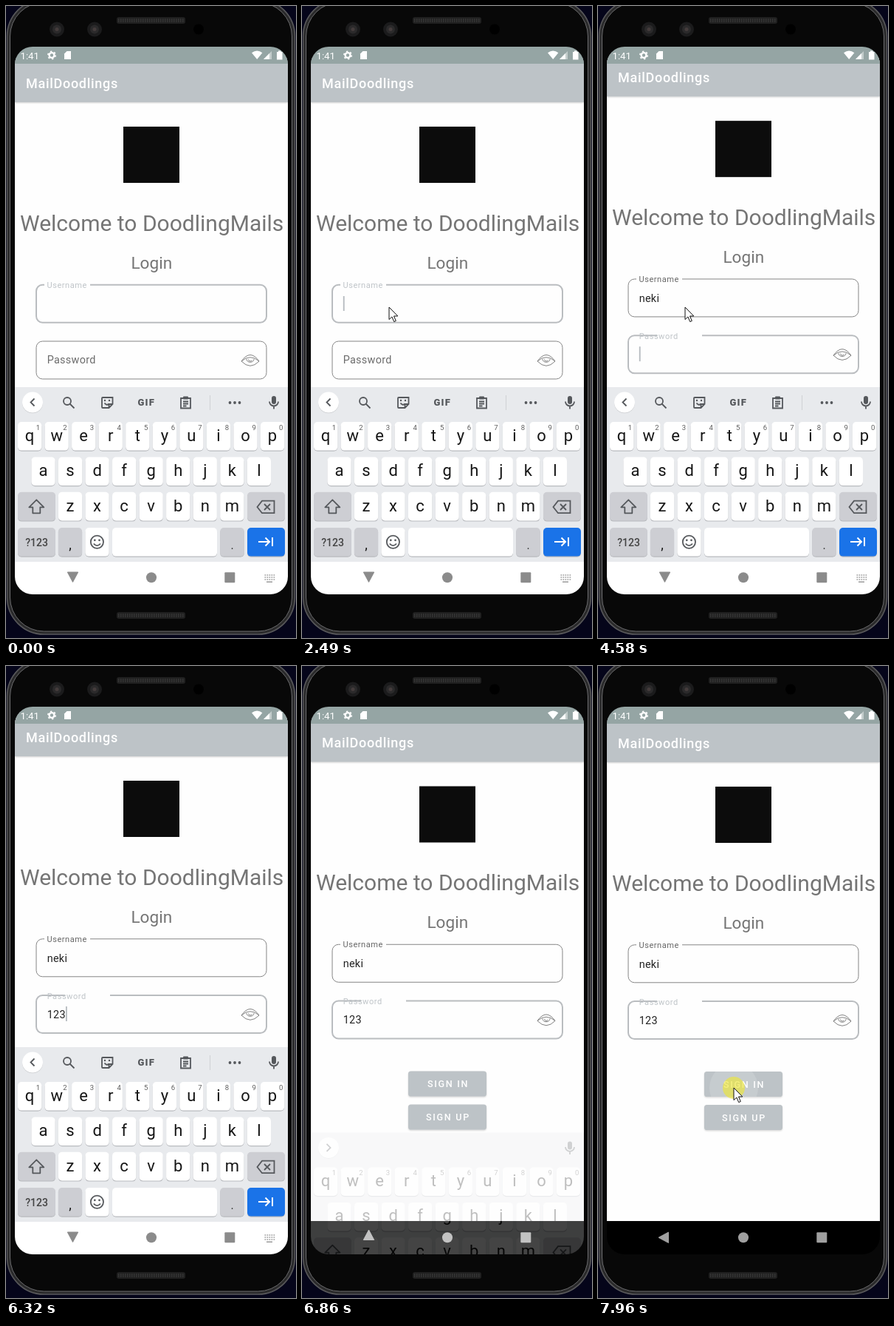
Recreate the animation shown at these times as an HTML page. Size 393 by 854 pixels, loop 8 s.

```html
<!DOCTYPE html>
<html lang="en">
<head>
<meta charset="utf-8">
<title>Login screen</title>
<style>
html, body { margin: 0; width: 100%; height: 100%; overflow: hidden; background: #05051a; }
svg { display: block; width: 100vw; height: 100vh; font-family: Roboto, "Noto Sans", sans-serif; }
text { white-space: pre; }
.mid { text-anchor: middle; }
.line { fill: none; stroke: #55585c; stroke-width: 1.8; }
</style>
</head>
<body>
<svg id="stage" viewBox="0 0 393 854"></svg>
<script>
const LOOP = 8000, USER = 'neki', PASS = '123';

const rect = (x, y, w, h, fill, r = 0, more = '') =>
  `<rect x="${x}" y="${y}" width="${w}" height="${h}" rx="${r}" fill="${fill}" ${more}/>`;
const circle = (x, y, r, fill, more = '') => `<circle cx="${x}" cy="${y}" r="${r}" fill="${fill}" ${more}/>`;
const path = (d, more = '') => `<path d="${d}" ${more}/>`;
const label = (s, x, y, size, fill, more = '') =>
  `<text x="${x}" y="${y}" font-size="${size}" fill="${fill}" ${more}>${s}</text>`;
const mid = (s, x, y, size, fill, more = '') => label(s, x, y, size, fill, 'class="mid" ' + more);

// Outlined text box whose top edge is open between a and b
const boxPath = (y, a, b) =>
  `M${b} ${y}H344.5a8.5 8.5 0 0 1 8.5 8.5v34a8.5 8.5 0 0 1-8.5 8.5H49.5a8.5 8.5 0 0 1-8.5-8.5v-34a8.5 8.5 0 0 1 8.5-8.5H${a}`;

function phone() {
  const speaker = y => rect(150, y, 93, 9, '#202020', 3) +
    path(`M152 ${y + 4.5}h89`, 'stroke="#343434" stroke-width="5" stroke-dasharray="1.5 1.5"');
  const lens = (x, r) => circle(x, 31.5, r, '#1b1b1c') + circle(x, 31.5, r * .6, '#2b2a2b') + circle(x, 31.5, 2.5, '#443c3c');
  return rect(1.5, -9, 390, 858, '#2a2a2b', 50, 'stroke="#5a5a5c" stroke-width="1.5"') +
    rect(5.5, -5, 382, 850, '#080808', 46, 'stroke="#6c6c6e" stroke-width="1"') +
    speaker(15) + speaker(819) + lens(69, 10) + lens(120, 10) + circle(261, 31.5, 7, '#000');
}

function statusBar() {
  return rect(12, 55, 370, 23, '#95a5a4') +
    label('1:41', 19.5, 71.5, 13.2, '#fff') +
    circle(62, 66.5, 3.4, 'none', 'stroke="#fff" stroke-width="2.4"') +
    circle(62, 66.5, 5.2, 'none', 'stroke="#fff" stroke-width="1.6" stroke-dasharray="2.4 3.04"') +
    path('M79 64.5l3.5-3.5h5.5v11h-9z', 'fill="#fff"') +
    path('M333 63.2q7.2-5.4 14.4 0L340.2 72z', 'fill="#fff"') +
    path('M360 61v11h-11z', 'fill="#fff" fill-opacity=".45"') + path('M357 64v8h-8z', 'fill="#fff"') +
    path('M367 62h2v-1.5h3.5V62h2v10.5H367z', 'fill="#fff"');
}

function button(s, y) {
  return rect(144, y + 1.2, 106, 34, '#000', 3.6, 'opacity=".16" filter="url(#soft)"') +
    rect(144, y, 106, 34, '#bdc3c7', 3.6) +
    mid(s, 198, y + 21.8, 12.6, '#fff', 'font-weight="500" letter-spacing="1.7"');
}

function page() {
  return rect(12, 78, 370, 680, '#fefefe') +
    rect(12, 80, 370, 51, '#000', 0, 'opacity=".18" filter="url(#soft)"') +
    rect(12, 70, 370, 60, '#bdc3c7') +
    label('MailDoodlings', 27, 111, 18, '#fff', 'font-weight="500" letter-spacing=".7"') +
    rect(159, 163, 76, 76, '#0c0c0c') +
    label('Welcome to DoodlingMails', 19, 304, 30, '#757575') +
    mid('Login', 197.3, 355, 22.6, '#757575') +
    '<path id="userBox" fill="none"/>' + label('Username', 55.5, 381, 11, '', 'id="userLabel" letter-spacing=".55"') +
    label('', 55.7, 408, 14.4, '#222', 'id="user" letter-spacing=".3"') +
    '<rect id="under" x="56" y="409.6" height="1" fill="#333"/>' +
    '<path id="passBox" fill="none"/>' + label('Password', 55.7, 483, 14.4, '', 'id="passLabel"') +
    label('', 55.7, 484, 14.4, '#222', 'id="pass" letter-spacing=".3"') +
    '<rect id="caret" width="1.8" height="20" fill="#b4babe"/>' +
    `<g fill="none" stroke="#757575" stroke-width=".9">
      <path d="M319 480q12-17 24 0q-12 12.5-24 0q12-10.5 24 0"/>
      <path d="M325.8 477a5.3 5.3 0 0 0 10.4 0M328.6 477.5a2.5 2.5 0 0 0 4.8 1"/></g>` +
    button('SIGN IN', 548) + button('SIGN UP', 593) +
    '<g clip-path="url(#signIn)"><circle id="ripple" cx="184" cy="570" r="33" fill="#fff" opacity=".14"/></g>';
}

function key(x, y, w, s = '', fill = '#fff') {
  return rect(x, y + 1.2, w, 38.6, '#b9bbbf', 5) + rect(x, y, w, 38.6, fill, 5) +
    (s && mid(s, x + w / 2, Math.round(y + 25.7), 22, '#161616'));
}

function keys() {
  const row = (s, x, y) => [...s].map((c, i) => key(x + i * 36.55, y, 32.2, c)).join('');
  const grey = '#cdced3';
  return row('qwertyuiop', 16, 562) +
    [...'1234567890'].map((c, i) => mid(c, 43.3 + i * 36.6, 573, 9.5, '#5c5c5c')).join('') +
    row('asdfghjkl', 34.4, 609.5) + row('zxcvbnm', 70.9, 656.8) +
    key(16, 656.8, 51, '', grey) + key(327, 656.8, 51, '', grey) +
    path('M41.3 667.3l10 10h-5v8h-10v-8h-5z', 'class="line" stroke-linejoin="round"') +
    path('M347 668.7h16.5v16.5H347l-6.5-8.2zM350 673l8 8m0-8l-8 8', 'class="line"') +
    key(16, 705, 51, '', grey) + mid('?123', 41.5, 730, 14, '#444', 'font-weight="500"') +
    key(70.9, 705, 32.2, '', grey) + mid(',', 87, 734, 18, '#161616') + key(107.4, 705, 32.2) +
    circle(123.4, 724.3, 8.6, 'none', 'class="line"') +
    circle(120.3, 721.8, 1.4, '#55585c') + circle(126.5, 721.8, 1.4, '#55585c') +
    path('M118.8 726.5q4.6 5.4 9.2 0', 'class="line"') +
    key(144, 705, 142) + key(290.2, 705, 32.6, '', grey) + mid('.', 306.5, 734, 16, '#333') +
    key(327, 705, 51, '', '#1a73e8') +
    path('M342 724h15m-5.5-5.5l5.5 5.5l-5.5 5.5M361 718v12', 'fill="none" stroke="#fff" stroke-width="2"');
}

function tools() {
  return circle(83, 534, 5, 'none', 'class="line"') + path('M86.5 537.5l6 6', 'class="line" stroke-width="2.4"') +
    path('M131 529h13.5v9l-5 5H131q-1 0-1-1v-12q0-1 1-1zM144.5 538h-5v5M133.5 536.5q3 4 6 1', 'class="line"') +
    circle(134, 533, 1.2, '#55585c') + circle(140, 533, 1.2, '#55585c') +
    mid('GIF', 190.3, 540.3, 13, '#55585c', 'font-weight="900" letter-spacing="1.2"') +
    path('M237 530h13v13.5h-13zM240 534.5h7m-7 3h7m-7 3h4.5', 'class="line" stroke-width="1.6"') +
    rect(240, 527.5, 7, 4, '#55585c', 1) + rect(276, 526, 1, 20, '#cfd1d5') +
    [303.5, 310, 316.5].map(x => circle(x, 536, 1.9, '#55585c')).join('');
}

function words() {
  return mid('', 95, 542, 16.7, '#4a4d50', 'id="guess"') +
    mid('Never', 196, 542, 16.7, '#4a4d50') + mid('Needs', 297.5, 542, 16.7, '#4a4d50') +
    rect(142, 524, 1, 24, '#cfd1d5') + rect(249, 524, 1, 24, '#cfd1d5');
}

function keyboard() {
  return rect(12, 515, 370, 237, '#e8eaed') + rect(12, 751, 370, 60, '#fff') +
    circle(36, 536.3, 14, '#c8cacd') + circle(36, 535.6, 14, '#fff') +
    '<path id="chevron" class="line"/>' +
    `<g id="tools">${tools()}</g><g id="words">${words()}</g>` +
    rect(360, 527, 6, 11, '#55585c', 3) + path('M357 534.5a6 6 0 0 0 12 0M363 540.5v4', 'class="line"') + keys() +
    path('M350.5 769h14m-14 3h14m-14 3h14', 'stroke="#9a9a9a" stroke-width="1.6" stroke-dasharray="1.7 1.3"') +
    path('M353 778.3h8', 'stroke="#9a9a9a" stroke-width="1.6"');
}

document.getElementById('stage').innerHTML =
  `<defs><filter id="soft" x="-10%" y="-30%" width="120%" height="160%"><feGaussianBlur stdDeviation="1.3"/></filter>
    <clipPath id="screen">${rect(12, 55, 370, 740, '#000', 24)}</clipPath>
    <clipPath id="signIn">${rect(144, 548, 106, 34, '#000', 3.6)}</clipPath></defs>` +
  phone() + `<g clip-path="url(#screen)"><g id="page">${page()}</g>${rect(12, 750, 370, 45, '#000')}
    <g id="keyboard">${keyboard()}</g>${statusBar()}
    <g id="nav"><path id="back" d="M-7.5 0L6-7.2V7.2z" stroke-width="1" stroke-linejoin="round"/>
      ${circle(197, 772.3, 7, '')}${rect(296.3, 765.3, 14, 14, '', 1)}</g></g>` +
  '<circle id="click" r="15" fill="#efe62e" opacity=".62"/>' +
  path('M0 0V16.6L3.9 13L6.7 19.6L9.3 18.5L6.5 12H11.8z', 'id="mouse" fill="#fff" stroke="#111" stroke-width="1"');

const el = {};
document.querySelectorAll('[id]').forEach(e => el[e.id] = e);
const set = (name, attrs) => { for (const k in attrs) el[name].setAttribute(k, attrs[k]); };
const show = (name, on) => el[name].setAttribute('visibility', on ? 'inherit' : 'hidden');
const ramp = (t, a, b) => Math.min(1, Math.max(0, (t - a) / (b - a)));
const mix = (a, b, u) => a + (b - a) * u;
const count = (times, t) => times.filter(x => t >= x).length;

const SPANS = [[530, 660, 3], [920, 1690, 12], [4370, 4650, 5], [5770, 6320, 8], [6790, 7550, 12], [7620, 7960, 6]];
function snap(t) {
  const span = SPANS.find(([a, b]) => t >= a && t < b);
  if (!span) return t;
  const [a, b, n] = span, step = (b - a) / (n - 1);
  return a + Math.floor((t - a) / step + .01) * step;
}

const MOUSE = [[530, 222, 562], [660, 166, 430], [870, 166, 430], [1270, 125, 337], [1690, 118, 407],
  [5770, 118, 407], [6241, 360, 381], [7180, 360, 450], [7550, 186, 607], [7620, 186, 607], [7890, 184, 570]];
const BLINKS = [390, 920, 1410, 1960, 2490, 2950, 3490, 5770, 6320, 6790, 7270, 7820];

function mouseAt(t) {
  const i = MOUSE.findIndex(k => k[0] > t);
  if (i === 0) return MOUSE[0].slice(1);
  if (i < 0) return MOUSE[MOUSE.length - 1].slice(1);
  const [a, x, y] = MOUSE[i - 1], [b, x2, y2] = MOUSE[i], u = ramp(t, a, b);
  return [mix(x, x2, u), mix(y, y2, u)];
}

function draw(time) {
  const t = snap(time), onPass = t >= 4370, closing = t >= 6790;

  const scroll = closing ? 8 * (1 - ramp(t, 6740, 6900)) ** 2 : onPass ? 8 * (1 - (1 - ramp(t, 4340, 4620)) ** 2) : 0;
  set('page', { transform: `translate(0 ${-scroll})` });

  const user = USER.slice(0, count([3750, 3890, 4020, 4150], t));
  const pass = PASS.slice(0, count([4980, 5110, 5310], t));
  el.user.textContent = user;
  el.pass.textContent = pass;
  const done = Math.max(0, user.length - 1);
  set('under', { width: done && !onPass ? el.user.getSubStringLength(0, done) : 0 });

  const look = on => ({ stroke: on ? '#babdc0' : '#858585', 'stroke-width': on ? 2 : 1 });
  set('userBox', { d: boxPath(376.8, 52, 114), ...look(!onPass) });
  set('userLabel', { fill: onPass ? '#666' : '#bfc4c8' });
  const lift = ramp(t, 4370, 4550);
  set('passBox', { d: boxPath(453, 80, mix(80, 141, lift)), ...look(onPass) });
  set('passLabel', { y: mix(483, 457.5, lift), 'font-size': mix(14.4, 11, lift),
    'letter-spacing': mix(.3, .55, lift), fill: onPass ? '#bfc4c8' : '#6c6c6c' });

  const typed = onPass ? el.pass : el.user;
  const width = typed.textContent ? typed.getComputedTextLength() : 0;
  set('caret', { x: 55.8 + width, y: onPass ? 468 : 392 });
  show('caret', count(BLINKS, t) % 2);

  const guessing = t >= 3890 && t < 4440;
  el.guess.textContent = user.slice(0, done);
  show('words', guessing);
  show('tools', !guessing && !closing);
  set('chevron', { d: guessing || closing ? 'M33.5 530.5l5 5l-5 5' : 'M38.5 530.5l-5 5l5 5' });

  const u = Math.max(0, (t - 6760) / 100);
  set('keyboard', { transform: `translate(0 ${117 * u ** 1.5})`, opacity: Math.max(0, 1 - .74 * u) });
  show('keyboard', u < 1.35);
  const turn = t < 6840 ? -90 : t < 6915 ? 90 : 0;
  const tone = t < 6840 ? '#8b8b8b' : t < 6915 ? '#c2c2c2' : '#a0a0a0';
  set('nav', { fill: tone, stroke: 'none' });
  set('back', { transform: `translate(${turn ? 90.5 : 89.5} ${turn ? 771 - ramp(turn, 0, 90) * 1.5 : 772.3}) rotate(${turn})`, stroke: tone });

  const [x, y] = mouseAt(t);
  set('mouse', { transform: `translate(${x} ${y})` });
  show('mouse', (t >= 530 && t < 6300) || t >= 7200);
  set('click', { cx: x, cy: y });
  show('click', (t >= 3350 && t < 3490) || t >= 7950);
  show('ripple', t >= 7950);
}

const start = performance.now();
function tick(now) {
  draw(Math.max(0, now - start) % LOOP);
  requestAnimationFrame(tick);
}
draw(0);
requestAnimationFrame(tick);
</script>
</body>
</html>
```
